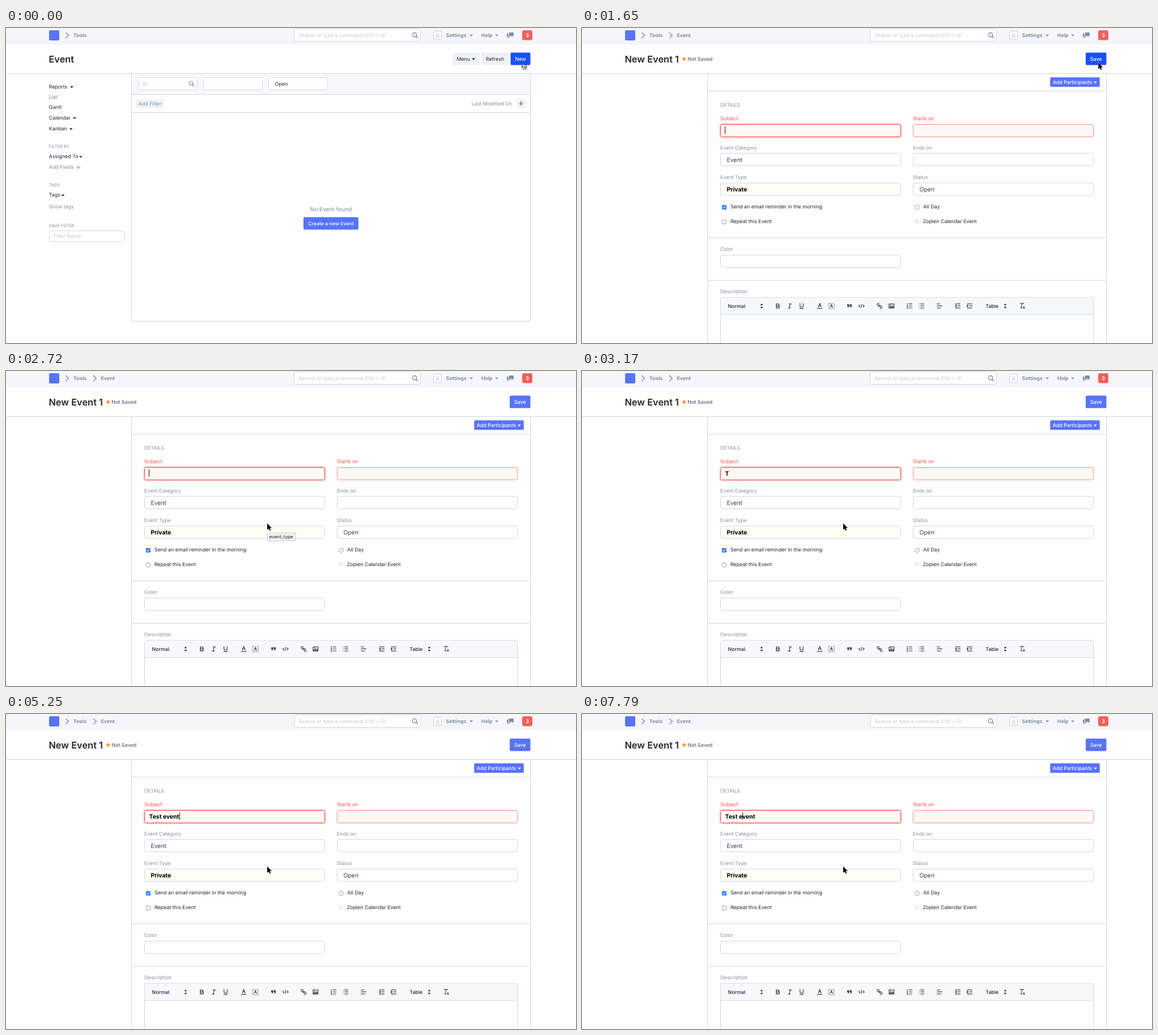
Write an HTML page that moves like this. It is 1006 px wide and 557 px high and loops after 8 s.

```html
<!DOCTYPE html>
<html lang="en">
<head>
<meta charset="utf-8">
<title>New event form</title>
<style>
  html, body { margin: 0; width: 100%; height: 100%; overflow: hidden; background: #fefefe; }
  svg { display: block; width: 1006px; height: 557px; }
  text {
    font-family: Inter, "Open Sans", sans-serif;
    white-space: pre;
    text-rendering: geometricPrecision;
  }
</style>
</head>
<body>
<svg id="stage" viewBox="0 0 1006 557"></svg>
<script>
const INK = '#1f272e', GREY = '#8491a0', PALE = '#c5cbd2', LINE = '#d1d8dd';
const BLUE = '#5873f7', HOVER = '#1b50f8', RED = '#f4504b', BAR = '#f6f9fc';
const SMALL = 8.9, VALUE = 10.44, CAPS = 7.46;

// Drawing helpers, each returns SVG markup
const text = (x, y, s, fill = INK, size = SMALL, weight = 400, more = '') =>
  `<text x="${x}" y="${y}" fill="${fill}" font-size="${size}" font-weight="${weight}" ${more}>${s}</text>`;
const mid = (x, y, s, fill, size, weight) => text(x, y, s, fill, size, weight, 'text-anchor="middle"');
const box = (x, y, w, h, fill, r = 2, stroke = 'none', more = '') =>
  `<rect x="${x}" y="${y}" width="${w}" height="${h}" rx="${r}" fill="${fill}" stroke="${stroke}" ${more}/>`;
const path = (d, stroke, width = 1, fill = 'none', more = '') =>
  `<path d="${d}" stroke="${stroke}" stroke-width="${width}" fill="${fill}" ${more}/>`;
const rule = y => path(`M222 ${y}H925`, LINE);
const caret = (x, y, fill = INK) => path(`M${x - 3} ${y - 1.4}h6l-3 3.1z`, 'none', 0, fill);
const lens = (x, y, color, r = 3.6) =>
  `<circle cx="${x - 1}" cy="${y - 1}" r="${r}" fill="none" stroke="${color}" stroke-width="1.2"/>` +
  path(`M${x + r * .5} ${y + r * .5}l3 3`, color, 1.6);
const chevron = x => path(`M${x - 2.6} 8l5.2 5l-5.2 5`, GREY, 1.5);
const field = (x, y, w = 318, h = 22, stroke = LINE, fill = '#fefefe') => box(x, y, w, h, fill, 3, stroke);
const icon = (x, d, fill = 'none', width = 1.7) =>
  `<g transform="translate(${x - 6.5} 485) scale(.72)">${path(d, '#3b424a', width, fill,
    'stroke-linecap="round" stroke-linejoin="round"')}</g>`;
const updown = x => path(`M${x - 2.4} 490.3l2.4-3l2.4 3zM${x - 2.4} 493l2.4 3l2.4-3z`, 'none', 0, INK);

function header() {
  return box(0, 0, 1006, 28.5, '#f4f6f9', 0) +
    path('M0 80.5H1006', LINE) +
    box(76, 4, 18, 18, BLUE) +
    chevron(108) + text(118.8, 16.3, 'Tools', GREY, SMALL, 700) +
    field(508.5, 1.5, 223) + text(516.6, 16.3, 'Search or type a command (Ctrl + G)', PALE, 8.85) +
    lens(722, 13, '#6f7a86') +
    box(754.5, 5.5, 14, 15, '#fafbfc', 2, '#c9d0d8') + mid(761.5, 16.5, 'A', '#b4bdc7') +
    text(776.6, 16.3, 'Settings', GREY, SMALL, 700) + caret(821, 13, GREY) +
    text(838.8, 16.3, 'Help', GREY, SMALL, 700) + caret(866, 13, GREY) +
    path('M887.5 8h8.5v6h-1.5v2.2l-2.2-2.2h-4.8zM884 10h2.6v5h4.4v1h-3l-2 2v-2h-2z', 'none', 0, GREY) +
    box(911, 4, 18, 17.5, '#f1625f', 3) + mid(920, 16.3, '3', '#fff', SMALL, 600);
}

function listPage() {
  const side = [
    [107, 'Reports', INK, 116], [125.2, 'List', '#6c7680'], [143.3, 'Gantt', INK],
    [162, 'Calendar', INK, 121], [181.2, 'Kanban', INK, 114.7],
    [230.4, 'Assigned To', INK, 131.8], [249.2, 'Add Fields', GREY],
    [298.4, 'Tags', INK, 100.5], [319.2, 'Show tags', GREY]
  ].map(([y, s, c, cx]) => text(75.8, y, s, c) + (cx ? caret(cx, y - 2.6) : '')).join('');
  const heads = [[211.8, 'FILTER BY'], [279.6, 'TAGS'], [352, 'SAVE FILTER']]
    .map(([y, s]) => text(75.8, y, s, GREY, CAPS)).join('');

  return text(75.4, 61, 'Event', INK, 16.4, 600) +
    box(788, 43.5, 48, 22, '#eff2f5') + text(795.4, 57.5, 'Menu') + caret(825, 55) +
    box(839, 43.5, 48, 22, '#eff2f5') + mid(863, 57.5, 'Refresh') +
    box(890.5, 43.5, 35, 22, HOVER) + mid(908, 57.5, 'New', '#fff', SMALL, 500) +
    side + heads + path('M124 246.3h7M127.5 242.8v7', GREY) +
    field(76.5, 358.5, 133, 19) + text(83.8, 371.4, 'Filter Name', PALE) +
    box(222, 81, 703, 36.5, BAR, 0) +
    path('M221.5 80V518.5H925.5V80', LINE) + rule(117.5) + rule(149.5) +
    [233.5, 348.5, 463.5].map(x => field(x, 87.5, 104)).join('') +
    text(241.3, 102, 'ID', PALE) + lens(327.5, 98.7, GREY, 3.2) + text(474.8, 102.3, 'Open') +
    box(229.5, 126, 49.5, 16, '#f0f3f6') + text(233.8, 137.3, 'Add Filter', GREY) +
    text(821.7, 137.3, 'Last Modified On', GREY) +
    box(901, 126, 16, 16, '#f0f3f6') + path('M907.8 129.5h2.4v3.6h2.6l-3.8 4.2l-3.8-4.2h2.6z', 'none', 0, GREY) +
    mid(573.4, 323.7, 'No Event found', '#7f8b98', 10.1) +
    box(525, 334.5, 97, 22, BLUE) + mid(573.5, 349, 'Create a new Event', '#fff', 8.75, 500);
}

function toolbar() {
  const rows = x => `M${x} 4H15M${x} 9H15M${x} 14H15`;
  return text(257.6, 495, 'Normal', INK, SMALL, 500) + updown(317) +
    icon(345.7, 'M5.5 4H9.5A2.5 2.5 0 0 1 9.5 9H5.5ZM5.5 9H10.5A2.5 2.5 0 0 1 10.5 14H5.5Z', 'none', 2) +
    icon(366.7, 'M7.5 4H13M5 14H10.5M8 14L10 4') +
    icon(387.6, 'M5 3V8.5A4 4 0 0 0 13 8.5V3M4.5 15.5H13.5') +
    icon(419.6, 'M5.5 11.5L9 2.5L12.5 11.5M6.8 8.5H11.2M3 15.2H15') +
    icon(440.3, 'M6 12.5L9 5L12 12.5M7 10H11', 'none', 1.5) +
    box(435.6, 487, 9.4, 9.4, 'none', 0, '#3b424a', 'stroke-dasharray="1.3 1.3"') +
    icon(472.2, 'M4 5.5H7.5V9Q7.5 12 5 12.5L5.6 9H4ZM10.5 5.5H14V9Q14 12 11.5 12.5L12.1 9H10.5Z', '#3b424a', 1.3) +
    icon(493.3, 'M5 6.5L2.5 9L5 11.5M13 6.5L15.5 9L13 11.5M10.2 5L7.8 13') +
    icon(525.2, 'M7 7L11 11M8 4.5Q5.5 2 3.6 3.9T5 8.5Q7.5 11 9.4 8.8M10 13.5Q12.5 16 14.4 14.1T13 9.5Q10.5 7 8.6 9.2') +
    icon(546.3, 'M3 4H15V14H3ZM4 13L7.5 9L9.5 11L11.5 8.5L14 13ZM6 6.5h.6') +
    icon(578.2, rows(7) + 'M3.2 3V5.4M2.6 8H4L2.8 10.3H4M2.6 13H4V15.2H2.6', 'none', 1.5) +
    icon(599.2, rows(7) + 'M3 4h.1M3 9h.1M3 14h.1') +
    icon(631.2, 'M3 4H9.5M3 9H15M3 14H11.5') +
    icon(663.2, 'M3 4H15M9 9H15M3 14H15M5.5 7V11L3 9Z', '#3b424a') +
    icon(684.2, 'M3 4H15M9 9H15M3 14H15M3 7V11L5.5 9Z', '#3b424a') +
    text(712.2, 495, 'Table', INK, SMALL, 500) + updown(747) +
    icon(776.6, 'M4.5 3H13.5M9.5 3L7 13M5 13.5H9M11.5 11L15.5 15M15.5 11L11.5 15', 'none', 1.5);
}

function formPage() {
  const left = 244.5, right = 584.5;
  const labels = [
    [left, 163.3, 'Subject', RED], [right, 163.3, 'Starts on', RED],
    [left, 214.8, 'Event Category'], [right, 214.8, 'Ends on'],
    [left, 267.1, 'Event Type'], [right, 267.1, 'Status'],
    [left, 394.4, 'Color'], [left, 469, 'Description']
  ].map(([x, y, s, c = GREY]) => text(x - .4, y, s, c)).join('');
  const checks = [
    [262, 319.3, 'Send an email reminder in the morning'], [262, 345.4, 'Repeat this Event'],
    [602.3, 319.3, 'All Day'], [601.5, 345.4, 'Zoplen Calendar Event']
  ].map(([x, y, s]) => text(x, y, s)).join('');
  const tick = (x, y) => box(x, y, 7, 7, '#fff', 1.5, '#9a9a9a', 'stroke-width=".9"');

  return chevron(156.7) + text(167.4, 16.3, 'Event', GREY, SMALL, 700) +
    text(75.4, 61, 'New Event 1', INK, 16.4, 600) +
    '<circle cx="180.2" cy="54.7" r="3" fill="#ffa031"/>' +
    text(186.2, 57.6, 'Not Saved', '#6c7680', SMALL, 600) +
    box(889, 43.5, 36.5, 22, BLUE, 2, 'none', 'id="save"') + mid(907.2, 57.6, 'Save', '#fff', SMALL, 500) +
    path('M221.5 80V557M925.5 80V557', LINE) + rule(111.5) + rule(371) + rule(446.3) +
    box(826.3, 87.3, 87.5, 16.6, BLUE, 1.5) + text(830.8, 98.9, 'Add Participants', '#fff', 8.8, 500) + caret(906, 96.2, '#fff') +
    text(244, 138.9, 'DETAILS', GREY, 8.7) + labels +
    box(243, 169, 321, 25, 'none', 4, '#fbd9d7', 'stroke-width="2"') +
    field(left, 170.5, 318, 22, '#f5403b', '#fffaf6') + field(right, 170.5, 318, 22, '#f58a86', '#fff9f5') +
    field(left, 221.5) + text(255.4, 237, 'Event', '#36414c', VALUE) + field(right, 221.5) +
    field(left, 274, 318, 22, LINE, '#fffdf4') + text(255.4, 289.4, 'Private', '#000', VALUE, 700) +
    field(right, 274) + text(595.5, 289.4, 'Open', '#36414c', VALUE) +
    box(247, 313, 8, 8, '#2f80f2', 1.5) + path('M248.8 317l1.6 1.8l2.8-3.8', '#fff', 1.1) +
    tick(247.5, 339.5) + tick(588, 313.5) + box(587, 338, 8, 8, '#f0f1f2', 1) + checks +
    field(left, 401.5) +
    box(left, 476.3, 658, 100, '#fefefe', 3, LINE) + box(245, 476.8, 657, 29.5, BAR, 2) +
    path('M244.5 506.5H902.5', LINE) + toolbar() +
    text(252.5, 184.9, '', '#000', VALUE, 700, 'id="subject"') +
    box(0, 174, 1, 13, '#111', 0, 'none', 'id="caret"') +
    `<g id="tip">${box(461.5, 286.5, 49, 14, '#f3f3f3', 0, '#cfcfcf')}${text(464.5, 296.3, 'event_type', '#222', 8.2)}</g>`;
}

const arrow = path('M0 0V11.4L2.6 9L4.3 12.7L6.2 11.9L4.5 8.2H8Z', '#fff', .9, '#000', 'id="arrow" paint-order="stroke"');
const hand = path('M3.5 7.5V2Q3.5 1 4.4 1T5.3 2V5.2Q6.3 4.6 7 5.4Q8 5 8.5 5.9Q9.8 5.6 9.9 7V9.5Q9.9 11 9 13H4.6' +
  'Q3.8 11.4 1.5 9Q.6 7.8 1.3 7.5Q2 7 3.5 8.6ZM5.4 8V10.6M7 8V10.6M8.5 8V10.6', '#111', .9, '#fff', 'id="hand"');

const $ = id => document.getElementById(id);
$('stage').innerHTML = box(0, 0, 1006, 557, '#fefefe', 0) + header() +
  `<g id="list">${listPage()}</g><g id="form">${formPage()}</g><g id="pointer">${arrow}${hand}</g>`;

// Each step changes part of the state; caret is a character index, -1 hides it
const LOOP = 8000, SUBJECT = 'Test event';
const steps = [
  [0, { page: 'list', shape: 'hand', x: 908.5, y: 60, save: HOVER, typed: 0, caret: 0, tip: 0 }],
  [150, { y: 62 }],
  [450, { x: 908 }],
  [1500, { shape: 'arrow', x: 911.3, y: 61.3 }],
  [1650, { page: 'form' }],
  [1970, { x: 640, y: 200, save: BLUE }],
  [2120, { x: 461, y: 269.5, caret: -1 }],
  [2570, { caret: 0, tip: .6 }],
  [2720, { tip: 1 }],
  [3170, { typed: 1, caret: -1, tip: 0 }],
  ...[3770, 3920, 4070, 4220, 4360, 4660, 4810, 4960, 5110, 5250]
    .map((t, i) => [t, { typed: i + 1, caret: i + 1 }]),
  [5550, { caret: -1 }],
  [6000, { caret: 10 }],
  ...[6450, 6600, 6740, 6890].map((t, i) => [t, { caret: 9 - i }]),
  [7190, { caret: -1 }],
  [7790, { caret: 6 }]
];

const stateAt = t => Object.assign({}, ...steps.filter(s => s[0] <= t).map(s => s[1]));
const show = (id, on) => { $(id).style.display = on ? '' : 'none'; };

function draw(t) {
  const s = stateAt(t), subject = $('subject');
  show('list', s.page === 'list');
  show('form', s.page === 'form');
  show('arrow', s.shape === 'arrow');
  show('hand', s.shape === 'hand');
  show('caret', s.caret >= 0);
  $('pointer').setAttribute('transform', `translate(${s.x} ${s.y})`);
  $('save').setAttribute('fill', s.save);
  $('tip').setAttribute('opacity', s.tip);
  subject.textContent = SUBJECT.slice(0, s.typed);
  if (s.page === 'form' && s.caret >= 0) {
    const run = s.caret ? subject.getSubStringLength(0, s.caret) : 0;
    $('caret').setAttribute('x', Math.round(252.4 + run));
  }
}

const start = performance.now();
function tick() {
  draw((performance.now() - start) % LOOP);
  requestAnimationFrame(tick);
}
tick();
</script>
</body>
</html>
```
